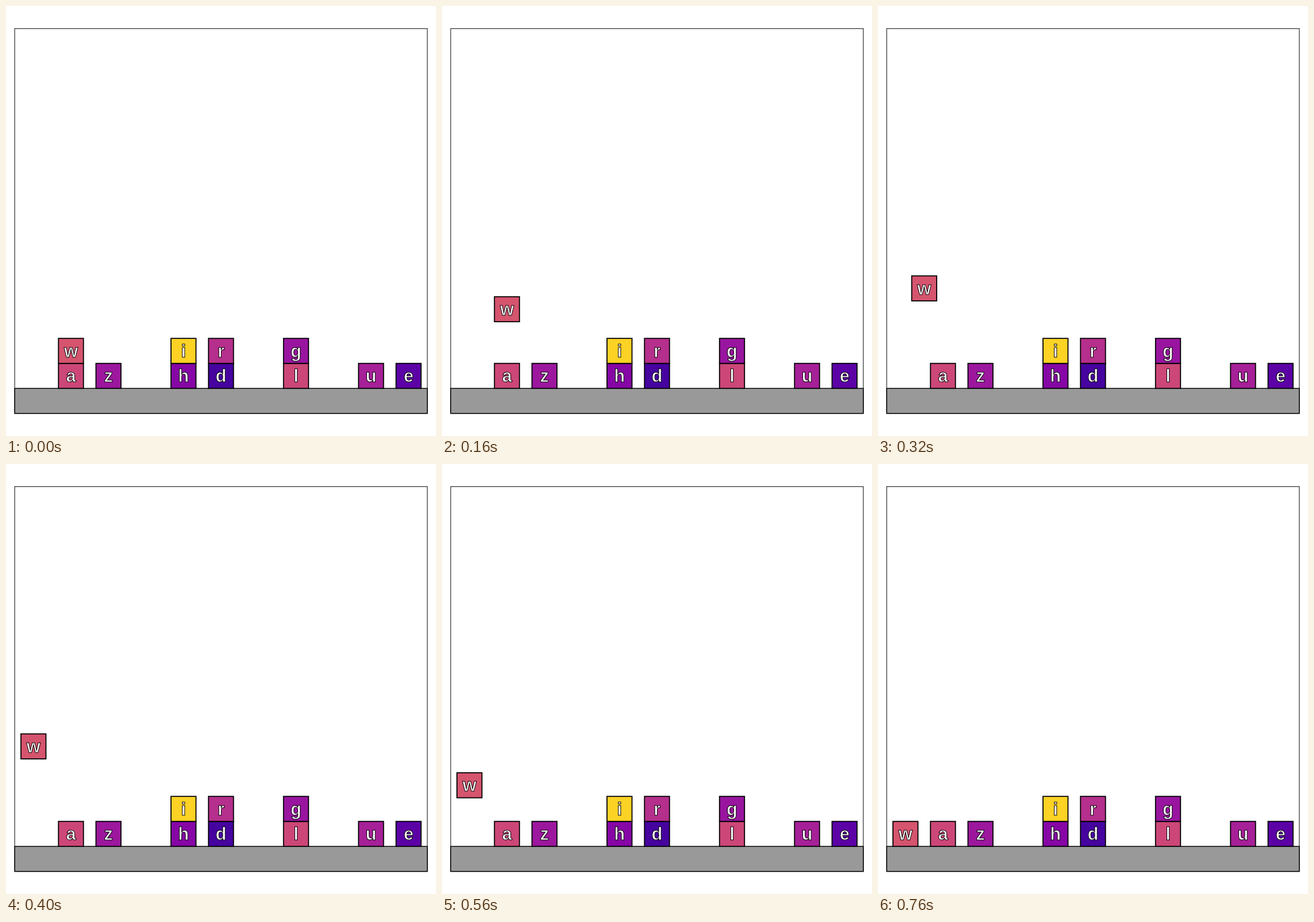
Write an HTML page with a canvas that moves like this. It is 748 px wide and 748 px high and loops after 0.8 s.

```html
<!DOCTYPE html>
<html lang="en">
<head>
<meta charset="utf-8">
<title>Stacking blocks</title>
<style>
  html, body { margin: 0; height: 100%; overflow: hidden; background: #fff; }
  canvas { display: block; }
</style>
</head>
<body>
<canvas id="stage" width="748" height="748"></canvas>
<script>
const ctx = document.getElementById('stage').getContext('2d');
const SIZE = 43.5, PITCH = SIZE * 1.5, FLOOR = 665.2, MIDDLE = 374;
const STEP = 40, STEPS = 20;

// letter, column, row, colour
const blocks = [
  ['a', 0, 0, '#cc4778'], ['z', 1, 0, '#9c179e'],
  ['h', 3, 0, '#8606a6'], ['i', 3, 1, '#fcd225'],
  ['d', 4, 0, '#46039f'], ['r', 4, 1, '#b52f8c'],
  ['l', 6, 0, '#cc4778'], ['g', 6, 1, '#99159f'],
  ['u', 8, 0, '#a62098'], ['e', 9, 0, '#5c01a6'],
];

function box(x, y, w, h, fill, line) {
  ctx.fillStyle = fill;
  ctx.lineWidth = line;
  ctx.fillRect(x, y, w, h);
  ctx.strokeRect(x, y, w, h);
}

function block(letter, column, row, colour) {
  const x = MIDDLE + (column - 4) * PITCH;
  const y = FLOOR - (row + 0.5) * SIZE;
  box(x - SIZE / 2, y - SIZE / 2, SIZE, SIZE, colour, 1.8);
  ctx.fillStyle = '#fff';
  ctx.lineWidth = 1;
  ctx.fillText(letter, x, y + 10.6);
  ctx.strokeText(letter, x, y + 10.6);
}

// Progress from 0 to 1 between two steps.
const ramp = (step, from, to) => Math.min(1, Math.max(0, (step - from) / (to - from)));

function draw(now) {
  const step = Math.floor(now / STEP) % STEPS;
  ctx.clearRect(0, 0, 748, 748);
  ctx.strokeStyle = '#000';
  ctx.lineJoin = 'miter';
  ctx.font = 'bold 31px "Liberation Sans", Arial, sans-serif';
  ctx.textAlign = 'center';

  const width = PITCH * 11, left = MIDDLE - width / 2;
  box(left, 39.3, width, 669.4, '#fff', 1);
  box(left, FLOOR, width, SIZE, '#999', 1.5);
  blocks.forEach(b => block(...b));

  // Lift, slide left, then lower to the floor.
  const column = -ramp(step, 6, 10);
  const row = 1 + 2.5 * ramp(step, 0, 6) - 3.5 * ramp(step, 10, 19);
  block('w', column, row, '#d5546e');
}

function tick() {
  draw(performance.now());
  requestAnimationFrame(tick);
}
tick();
</script>
</body>
</html>
```
